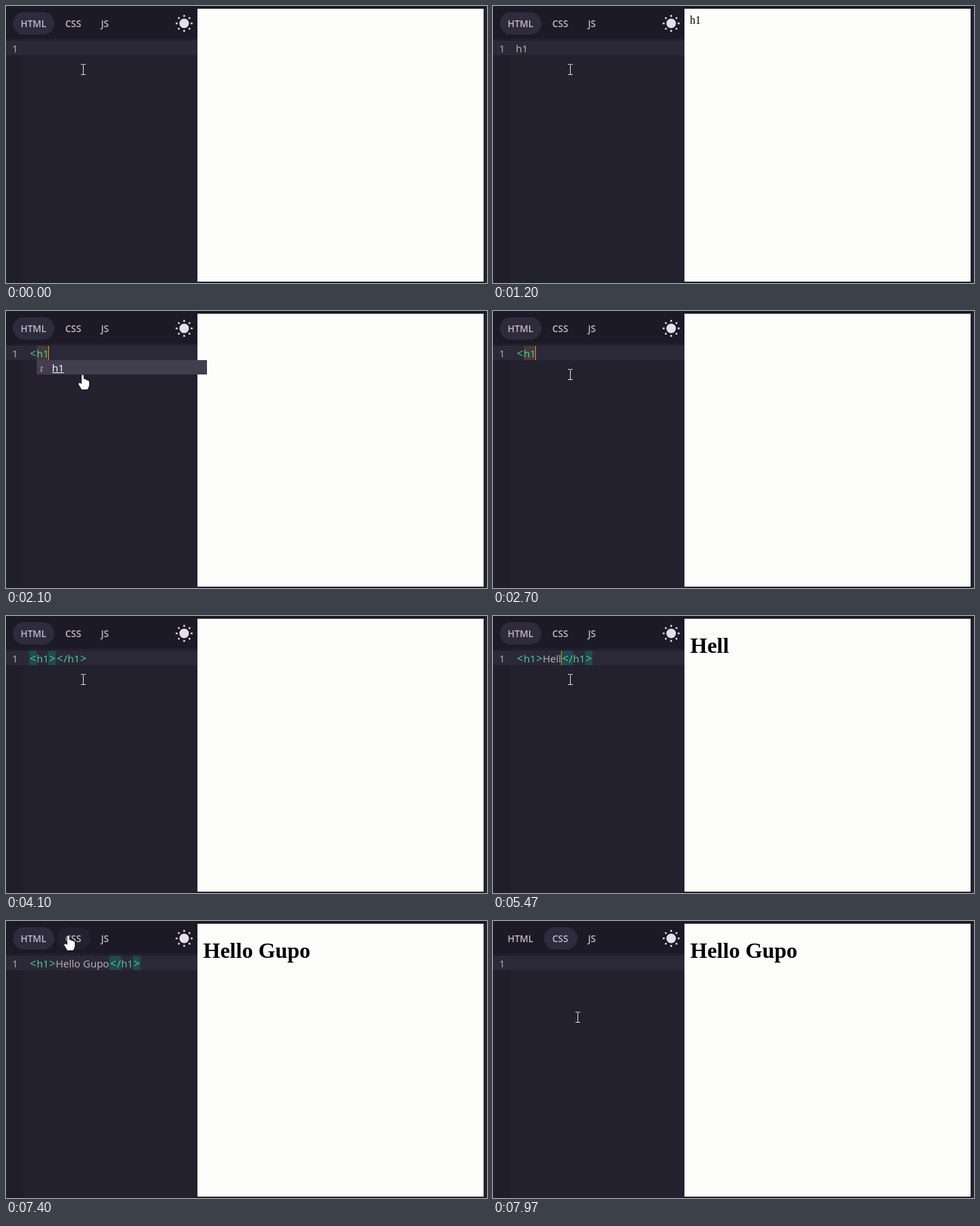
Write an HTML page with a canvas that moves like this. It is 706 px wide and 406 px high and loops after 8 s.

```html
<!DOCTYPE html>
<html lang="en">
<head>
<meta charset="utf-8">
<title>Live code editor</title>
<style>
html, body { margin: 0; width: 100%; height: 100%; overflow: hidden; background: #23212e; }
canvas { display: block; }
</style>
</head>
<body>
<canvas id="stage" width="706" height="406"></canvas>
<script>
const LOOP = 8000;
const BLINK = 1200;
const SANS = '"Open Sans", "Noto Sans", sans-serif';
const SERIF = '"Liberation Serif", "Times New Roman", serif';
const CODE = '15px ' + SANS;
const ctx = document.getElementById('stage').getContext('2d');

const color = {
  editor: '#23212e', gutter: '#201e2a', header: '#1c1a26', line: '#2b2938', pill: '#2d2b3c', hover: '#232130',
  page: '#fdfdfc', tab: '#c2bbc8', text: '#bbb4be', number: '#b6b0b2', tag: '#50d2a0',
  bracket: '#22494f', match: '#453a3a', caret: '#e0903c', popup: '#423e50', sun: '#e6deec'
};

// [time, mode, text]
const keys = [
  [-700, 'plain', ''],
  [370, 'plain', 'h'], [540, 'plain', 'h1'],
  [1400, 'plain', 'h'], [1530, 'plain', ''],
  [1730, 'open', ''], [1900, 'open', 'h'], [2070, 'open', 'h1'], [2670, 'open', 'h1'],
  [3430, 'pair', '']
];
const letterTimes = [4900, 5070, 5230, 5400, 5570, 5740, 5930, 6140, 6350, 6570];
letterTimes.forEach((at, i) => keys.push([at, 'pair', 'Hello Gupo'.slice(0, i + 1)]));

const POPUP = [2070, 2550];
const TAB_CLICK = 7500;
const tabs = [
  { name: 'HTML', x: 10, w: 61, tx: 21.5 },
  { name: 'CSS', x: 75, w: 49, tx: 87 },
  { name: 'JS', x: 127, w: 38, tx: 139.5 }
];

function rect(x, y, w, h, fill) {
  ctx.fillStyle = fill;
  ctx.fillRect(x, y, w, h);
}

function text(str, x, y, font, fill, align = 'left') {
  ctx.font = font;
  ctx.fillStyle = fill;
  ctx.textAlign = align;
  ctx.fillText(str, x, y);
}

function ease(t, from, to) {
  const p = Math.min(1, Math.max(0, (t - from) / (to - from)));
  return p * p * (3 - 2 * p);
}

function pointer(t) {
  const up = ease(t, 6620, 7380), down = ease(t, 7530, 7970);
  return {
    x: 113 - 21 * up + 32 * down,
    y: 93 - 72 * up + 120 * down
  };
}

function drawTabs(active, hovered) {
  for (const tab of tabs) {
    if (tab === active || tab === hovered) {
      ctx.fillStyle = tab === active ? color.pill : color.hover;
      ctx.beginPath();
      ctx.roundRect(tab.x, 9, tab.w, 33, 16.5);
      ctx.fill();
    }
    text(tab.name, tab.tx, 31, '600 13.5px ' + SANS, color.tab);
  }
}

function drawSun(x, y) {
  ctx.fillStyle = ctx.strokeStyle = color.sun;
  ctx.lineWidth = 2.4;
  ctx.beginPath();
  ctx.arc(x, y, 7, 0, Math.PI * 2);
  ctx.fill();
  for (let i = 0; i < 8; i++) {
    const a = i * Math.PI / 4, c = Math.cos(a), s = Math.sin(a);
    ctx.beginPath();
    ctx.moveTo(x + c * 9.6, y + s * 9.6);
    ctx.lineTo(x + c * 12.4, y + s * 12.4);
    ctx.stroke();
  }
}

function angle(ch, cell) {
  text(ch, cell + 5.5, 68, '16px ' + SANS, color.tag, 'center');
}

function drawOpenTag(name, closed, marked) {
  if (marked) {
    rect(34, 51, 11, 21, color.bracket);
    rect(62, 51, 11, 21, color.bracket);
  }
  angle('<', 34);
  text(name, 45, 68, CODE, color.tag);
  if (closed) angle('>', 62.5);
}

function drawCloseTag(x, marked) {
  if (marked) {
    rect(x, 51, 17, 21, color.bracket);
    rect(x + 34.5, 51, 11, 21, color.bracket);
  }
  angle('<', x);
  text('/', x + 11, 68, CODE, color.tag);
  text('h1', x + 17, 68, CODE, color.tag);
  angle('>', x + 34.5);
}

// Draws the code line and returns the caret position.
function drawCode(mode, str) {
  ctx.font = CODE;
  const w = ctx.measureText(str).width;
  if (mode === 'plain') {
    text(str, 33.5, 68, CODE, color.text);
    return 34 + w;
  }
  if (mode === 'open') {
    if (str === 'h1') rect(45, 51, 17, 21, color.match);
    drawOpenTag(str, false, false);
    return 44.5 + w;
  }
  drawOpenTag('h1', true, !str);
  text(str, 73, 68, CODE, color.text);
  drawCloseTag(73.5 + w, !!str);
  return 73 + w;
}

function drawPopup() {
  rect(45, 72, 250, 21, color.popup);
  text('t', 50, 89, 'italic 15px ' + SERIF, color.number);
  text('h1', 67.5, 89, CODE, '#fff');
  rect(68, 90, 17, 1, '#fff');
}

function drawBeam(x, y) {
  x = Math.round(x);
  y = Math.round(y);
  const fill = '#e6e2e8';
  rect(x, y - 7, 1, 15, fill);
  for (const end of [-8, 7]) {
    rect(x - 3, y + end, 3, 1, fill);
    rect(x + 1, y + end, 3, 1, fill);
  }
}

function drawHand(x, y) {
  ctx.save();
  ctx.translate(Math.round(x), Math.round(y));
  ctx.beginPath();
  ctx.moveTo(-2, 2);
  ctx.quadraticCurveTo(-.5, -.8, 1, 2);
  ctx.lineTo(1, 7);
  ctx.quadraticCurveTo(3, 5.8, 4, 8);
  ctx.quadraticCurveTo(6, 7, 6.5, 9);
  ctx.quadraticCurveTo(9, 8.6, 9, 11);
  ctx.lineTo(9, 16);
  ctx.quadraticCurveTo(8.5, 19, 6.5, 22);
  ctx.lineTo(-2, 22);
  ctx.quadraticCurveTo(-4, 18, -6.5, 14.5);
  ctx.quadraticCurveTo(-6.5, 11, -2, 14);
  ctx.closePath();
  ctx.lineWidth = 1.4;
  ctx.strokeStyle = '#14131a';
  ctx.stroke();
  ctx.fillStyle = '#fff';
  ctx.fill();
  ctx.restore();
}

function drawPage(mode, str) {
  rect(281, 4, 420, 400, color.page);
  if (mode === 'plain') text(str, 289, 26, '16px ' + SERIF, '#000');
  if (mode === 'pair') text(str, 289.5, 54, 'bold 32px ' + SERIF, '#000');
}

function draw(t) {
  const [keyTime, mode, str] = keys.findLast(k => k[0] <= t);
  const css = t >= TAB_CLICK;
  const p = pointer(t);
  const popup = t >= POPUP[0] && t < POPUP[1];
  const hovered = tabs.find(b => p.y > 9 && p.y < 42 && p.x > b.x && p.x < b.x + b.w);

  rect(0, 0, 706, 406, color.editor);
  rect(0, 48, 26, 358, color.gutter);
  rect(0, 0, 706, 4, color.header);
  rect(0, 0, 281, 48, color.header);
  rect(0, 51, 281, 21, color.line);
  drawTabs(tabs[css ? 1 : 0], hovered);
  drawSun(261.5, 25.5);
  text('1', 9, 68, CODE, color.number);
  drawPage(mode, str);

  if (!css) {
    const x = drawCode(mode, str);
    if ((t - keyTime) % BLINK < BLINK / 2) rect(Math.round(x), 51, 1, 21, color.caret);
  }
  if (popup) drawPopup();
  if (popup || hovered) drawHand(p.x, p.y);
  else drawBeam(p.x, p.y);
}

function tick() {
  draw(performance.now() % LOOP);
  requestAnimationFrame(tick);
}
tick();
</script>
</body>
</html>
```
